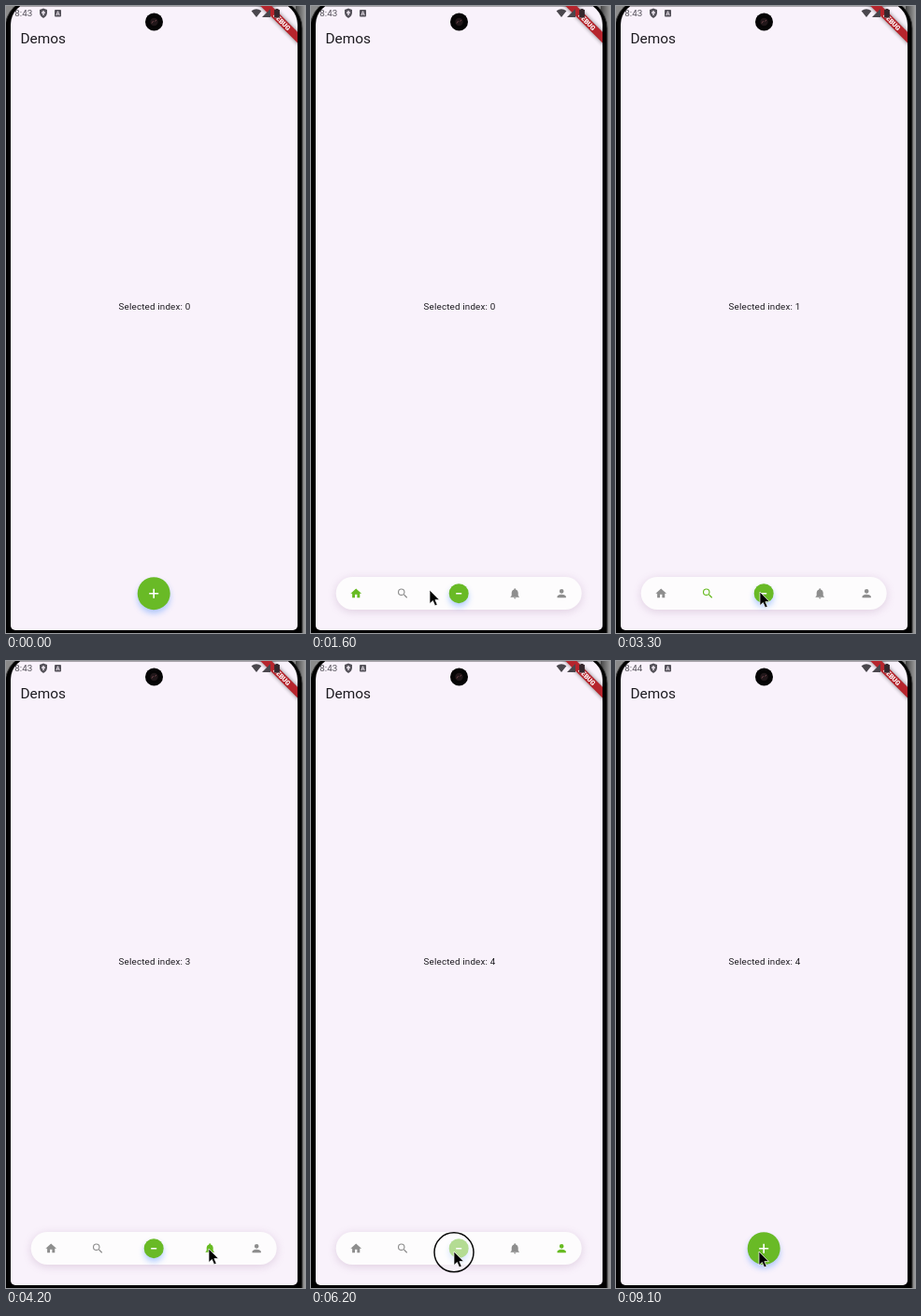
An HTML page that plays this animation: 320x671 px, repeating every 9200 ms.

```html
<!DOCTYPE html>
<html lang="en">
<head>
<meta charset="utf-8">
<title>Demos</title>
<style>
  html, body { margin: 0; width: 100%; height: 100%; overflow: hidden; background: #000; }
  svg { display: block; width: 320px; height: 671px; }
  text { font-family: Roboto, sans-serif; fill: #1d1b20; }
  .status { fill: #55525a; }
  .icon { fill: #8e8e8e; }
  .icon.on { fill: #68bb22; }
</style>
</head>
<body>
<svg viewBox="0 0 320 671">
  <defs>
    <clipPath id="screen"><path d="M5 20A24 24 0 0 1 29 -4H288A24 24 0 0 1 312 20V663A5 5 0 0 1 307 668H10A5 5 0 0 1 5 663Z"/></clipPath>
    <clipPath id="reveal"><rect id="revealBox"/></clipPath>
    <filter id="soft" x="-20%" y="-80%" width="140%" height="260%"><feGaussianBlur stdDeviation="5"/></filter>
    <filter id="glow" x="-60%" y="-60%" width="220%" height="220%"><feGaussianBlur stdDeviation="3.2"/></filter>
    <filter id="shade" x="-20%" y="-80%" width="140%" height="260%"><feGaussianBlur stdDeviation="2"/></filter>
    <linearGradient id="edge"><stop offset="0" stop-color="#444"/><stop offset="1" stop-color="#999"/></linearGradient>
  </defs>

  <rect width="320" height="671" fill="#8b8b8b"/>
  <rect x="310" width="10" height="671" fill="url(#edge)"/>
  <rect x="-1" y="-8" width="318" height="720" rx="32" stroke="#3c3c3c"/>

  <g clip-path="url(#screen)">
    <rect width="320" height="671" fill="#f9f2fb"/>
    <rect width="320" height="1" fill="#aaa5ac"/>
    <text x="15.4" y="40.3" font-size="15.4">Demos</text>
    <text id="label" x="120.6" y="325.3" font-size="9.8" letter-spacing=".175"></text>

    <g id="dock" clip-path="url(#reveal)">
      <rect id="pillShade" y="613" height="35" rx="17.5" fill="#a57fa8" opacity=".3" filter="url(#soft)"/>
      <rect id="pill" y="611" height="35" rx="17.5" fill="#fdfcfd"/>
      <g id="icons"></g>
    </g>
    <g id="fabClip">
      <g id="fab">
        <circle id="fabGlow" cy="4" fill="#4c8dff" opacity=".42" filter="url(#glow)"/>
        <circle id="fabDisc" fill="#69ba26"/>
        <path id="sign" fill="none" stroke="#fff" stroke-width="1.6"/>
      </g>
    </g>

    <g transform="translate(312 0) rotate(45)">
      <rect x="-32" y="19.6" width="64" height="8.4" opacity=".5" filter="url(#shade)"/>
      <rect x="-32" y="19.6" width="64" height="8.4" fill="#b6252d"/>
      <text y="26.3" font-size="7.1" font-weight="900" text-anchor="middle" style="fill:#fff">DEBUG</text>
    </g>

    <text id="clock" class="status" x="9.3" y="11.4" font-size="9.8"></text>
    <g class="status">
      <path d="M40 2.5l4 1.6v3q0 4-4 5.8q-4-1.8-4-5.8v-3z"/>
      <path d="M40 5v5M38 7.2h4" stroke="#f9f2fb" stroke-width="1.3"/>
      <rect x="52" y="4" width="7" height="7.6" rx="1"/>
      <path d="M53.8 10l1.7-4.3 1.7 4.3M54.4 8.8h2.2" fill="none" stroke="#f9f2fb" stroke-width=".8"/>
    </g>
    <g fill="#4a474d">
      <path d="M262.6 5.2q5.4-4 10.8 0L268 12z"/>
      <path d="M283 3v9h-9z"/>
      <path d="M288.5 3h3v1h1.4v8.5h-5.8V4h1.4z" fill="#35272d"/>
    </g>
  </g>

  <circle cx="158.5" cy="17" r="9.5" fill="#060506"/>
  <circle cx="158.5" cy="17" r="4.2" fill="#21171a"/>
  <path d="M156 18.5l1.6-2.4M159.5 16.5l1.4-1.6" stroke="#70444a" stroke-width="1"/>

  <circle id="ring" r="21" fill="#fff" fill-opacity=".5" stroke="#0a0a0a" stroke-width="1.5"/>
  <path id="cursor" d="M0 0V14.6L3.4 11.5 5.7 16.8 8.2 15.7 5.9 10.6H10.4Z" stroke="#fff" stroke-width=".7"/>
</svg>
<script>
const LOOP = 9200, STEP = 100;
const CX = 158.2, CY = 628.7;
const $ = id => document.getElementById(id);

const set = (el, attrs) => {
  for (const k in attrs) el.setAttribute(k, attrs[k]);
  return el;
};
const make = (tag, attrs, parent) =>
  parent.appendChild(set(document.createElementNS('http://www.w3.org/2000/svg', tag), attrs));

// Offset from the centre, tab index and 24-unit outline of each tab icon
const tabs = [
  { dx: -110, tab: 0, d: 'M10 20v-6h4v6h5v-8h3L12 3 2 12h3v8z' },
  { dx: -60, tab: 1, d: 'M15.5 14h-.79l-.28-.27A6.47 6.47 0 0 0 16 9.5 6.5 6.5 0 1 0 9.5 16c1.61 0 3.09-.59 4.23-1.57l.27.28v.79l5 4.99L20.49 19zm-6 0a4.5 4.5 0 1 1 0-9 4.5 4.5 0 0 1 0 9z' },
  { dx: 60, tab: 3, d: 'M12 22a2 2 0 0 0 2-2h-4a2 2 0 0 0 2 2zm6-6v-5c0-3.07-1.64-5.64-4.5-6.32V4a1.5 1.5 0 0 0-3 0v.68C7.63 5.36 6 7.92 6 11v5l-2 2v1h16v-1z' },
  { dx: 110, tab: 4, d: 'M12 12a4 4 0 1 0 0-8 4 4 0 0 0 0 8zm0 2c-2.67 0-8 1.34-8 4v2h16v-2c0-2.66-5.33-4-8-4z' }
];
for (const t of tabs) t.el = make('path', { d: t.d }, $('icons'));

// Pointer stops: time, x, y
const stops = [
  [300, 324, 480], [700, 161, 623], [1300, 161, 623], [1900, 93, 627],
  [2850, 93, 627], [3300, 154, 627], [3700, 217, 629], [4400, 217, 629],
  [4800, 268, 628.5], [5300, 268, 628.5], [5800, 153, 632], [LOOP, 153, 632]
];
const presses = [800, 2200, 4000, 5000, 6100];
const PRESS = 200;
const picks = [[2400, 1], [4200, 3], [5200, 4]];

const clamp = v => Math.min(1, Math.max(0, v));
const mix = (a, b, p) => a + (b - a) * p;
const smooth = p => p * p * (3 - 2 * p);
const easeOut = p => 1 - Math.pow(1 - clamp(p), 3.1);

function pointerAt(t) {
  const i = stops.findIndex((s, n) => n && t < s[0]);
  const [a, b] = [stops[i - 1], stops[i]];
  const p = smooth(clamp((t - a[0]) / (b[0] - a[0])));
  return [mix(a[1], b[1], p), mix(a[2], b[2], p)];
}

function drawDock(t, selected) {
  const open = easeOut((t - 900) / 300) - easeOut((t - 6300) / 300);
  const moving = open > 0.001 && open < 0.999;
  const half = mix(17.5, 131.5, open);
  const span = { x: CX - half, width: half * 2 };
  set($('pill'), span);
  set($('pillShade'), span);
  set($('dock'), { visibility: open > 0.001 ? 'visible' : 'hidden' });
  set($('revealBox'), moving
    ? { x: CX - half - 10, y: 611, width: half * 2 + 20, height: 35 }
    : { x: 0, y: 560, width: 320, height: 111 });

  const spread = 1 - 0.35 * (1 - open);
  for (const { el, dx, tab } of tabs) set(el, {
    class: tab === selected ? 'icon on' : 'icon',
    opacity: clamp(open * 1.2),
    transform: `translate(${CX + dx * spread} ${CY}) scale(.583) translate(-12 -12)`
  });

  const r = mix(17.5, 10.5, Math.pow(open, 4.6));
  const arm = 5 * r / 17.5, up = arm * (1 - open);
  set($('fab'), { transform: `translate(${CX} ${CY - 24 * open * (1 - open)})` });
  set($('fabClip'), { 'clip-path': moving ? 'url(#reveal)' : 'none' });
  set($('fabGlow'), { r });
  set($('fabDisc'), { r });
  set($('sign'), {
    d: `M${-arm} 0H${arm}M0 ${-up}V${up}`,
    opacity: moving ? 0.7 : 1
  });
}

function draw(t) {
  const selected = picks.reduce((s, [at, tab]) => t >= at ? tab : s, 0);
  $('label').textContent = 'Selected index: ' + selected;
  $('clock').textContent = t < 8500 ? '8:43' : '8:44';
  drawDock(t, selected);

  const [x, y] = pointerAt(t);
  const pressed = presses.some(at => t >= at && t < at + PRESS);
  set($('cursor'), {
    transform: `translate(${x} ${y})`,
    visibility: t < stops[0][0] ? 'hidden' : 'visible'
  });
  set($('ring'), { cx: x, cy: y + 0.8, visibility: pressed ? 'visible' : 'hidden' });
}

const start = performance.now();
function tick() {
  const t = (performance.now() - start) % LOOP;
  draw(Math.floor(t / STEP) * STEP);
  requestAnimationFrame(tick);
}
tick();
</script>
</body>
</html>
```
